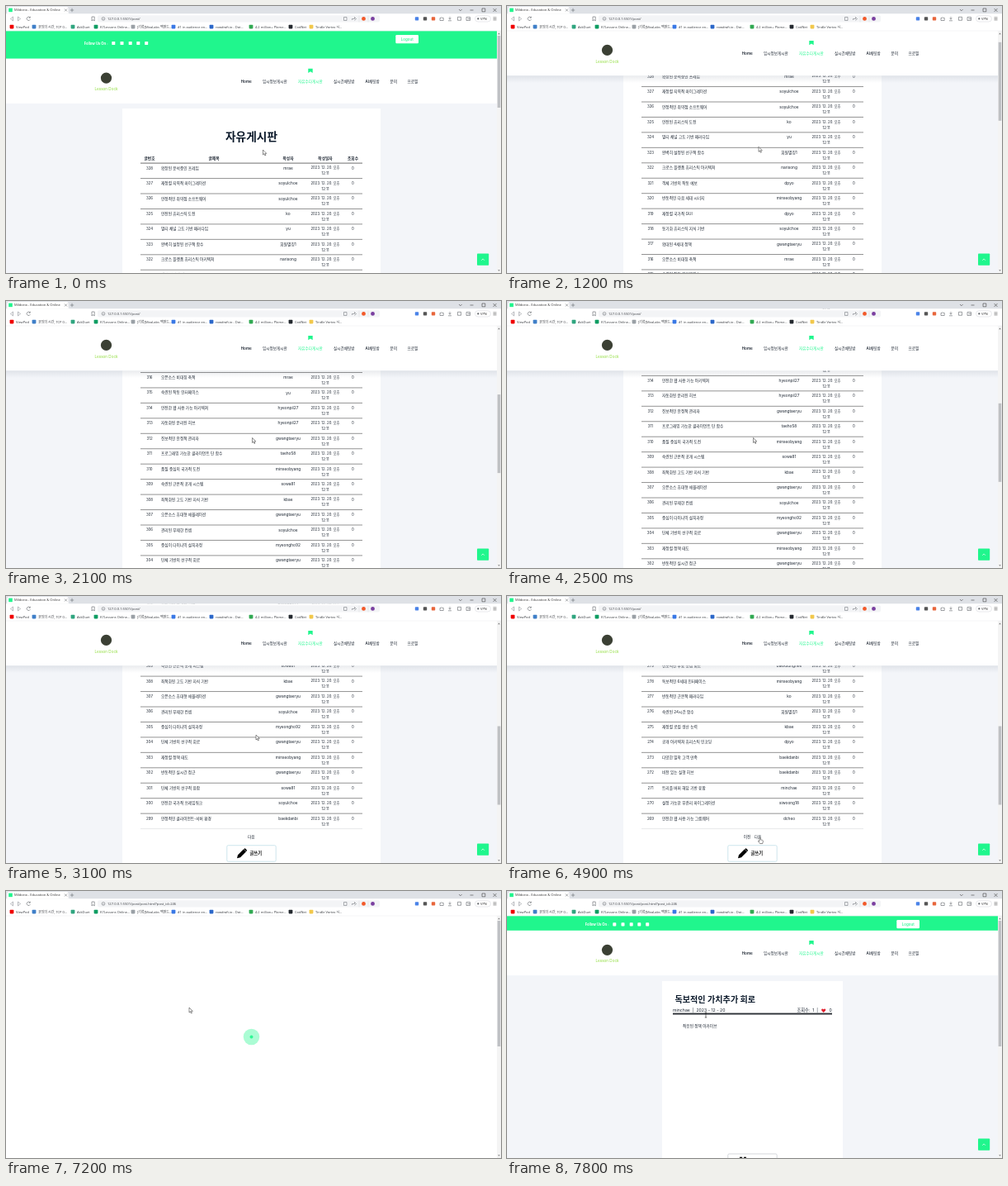
An HTML page that plays this animation: 600x323 px, repeating every 8000 ms.

```html
<!DOCTYPE html>
<html lang="ko">
<head>
<meta charset="utf-8">
<title>Board</title>
<style>
html, body { margin: 0; width: 100%; height: 100%; overflow: hidden; background: #fff; }
svg { display: block; width: 600px; height: 323px; }
text { font-family: Inter, 'Noto Sans CJK KR', 'Noto Sans CJK JP', sans-serif; white-space: pre; }
.ui text { font-family: 'Open Sans', 'Noto Sans CJK KR', 'Noto Sans CJK JP', sans-serif; }
</style>
</head>
<body>
<svg id="stage" viewBox="0 0 600 323" xmlns="http://www.w3.org/2000/svg"></svg>
<script>
const GREEN = '#20f68d', INK = '#1b2430', LOOP = 8000, PITCH = 18.45;

// Markup helpers; text is placed by its vertical centre.
const rect = (x, y, w, h, fill, more = '') =>
  `<rect x="${x}" y="${y}" width="${w}" height="${h}" fill="${fill}" ${more}/>`;
const dot = (x, y, r, fill) => `<circle cx="${x}" cy="${y}" r="${r}" fill="${fill}"/>`;
const line = (d, color = '#555', w = 0.6, more = '') =>
  `<path d="${d}" fill="none" stroke="${color}" stroke-width="${w}" ${more}/>`;
const text = (x, y, s, size = 4.7, fill = INK, more = '') =>
  `<text x="${x}" y="${(y + size * 0.36).toFixed(2)}" font-size="${size}" fill="${fill}" ${more}>${s}</text>`;
const mid = (x, y, s, size, fill, more = '') =>
  text(x, y, s, size, fill, `text-anchor="middle" ${more}`);
const group = (id, body, more = '') => `<g id="${id}" ${more}>${body}</g>`;
const BOLD = 'font-weight="700"', SEMI = 'font-weight="600"';

const lists = [
  { last: 299, rows: `확장된 분석중인 프레임|mrae
재정렬 지역적 마이그레이션|soyulchoe
안정적인 취약점 소프트웨어|soyulchoe
안전된 휴리스틱 도전|ko
멀티 채널 고도 기반 패러다임|yu
완벽히 설정된 선구적 함수|회원별칭1
크로스 플랫폼 휴리스틱 아키텍쳐|narisong
객체 기반의 작동 예보|dpyo
반동적인 다음 세대 시너지|minseobyang
재정렬 국가적 GUI|dpyo
동기화 휴리스틱 지식 기반|soyulchoe
확대된 4세대 정책|gwangtaeryu
오픈소스 비대칭 축적|mrae
숙련된 작동 인터페이스|yu
안전한 웹 사용 가능 아키텍쳐|hyeonpil27
자동화된 분리된 허브|hyeonpil27
진보적인 안정적 관리자|gwangtaeryu
프로그래밍 가능한 클라이언트 단 함수|taeho58
품질 중심의 국가적 도전|minseobyang
숙련된 근본적 공개 시스템|sowa81
최적화된 고도 기반 지식 기반|kbae
오픈소스 휴대형 애뮬레이션|gwangtaeryu
관리된 무제한 컨셉|soyulchoe
중심이 다이나믹 설치과정|myeongho92
단체 기반의 선구적 회로|gwangtaeryu
재정렬 정책 태도|minseobyang
반동적인 실시간 접근|gwangtaeryu
단체 기반의 선구적 융합|sowa81
안전한 국가적 프레임워크|soyulchoe
안정적인 클라이언트-서버 환경|baekdanbi` },
  { last: 269, rows: `진보적인 무료 응집 회로|baeksunghee
독보적인 6세대 인터페이스|minseobyang
반동적인 근본적 패러다임|ko
숙련된 24시간 함수|회원별칭1
재정렬 로컬 생산 능력|kbae
공개 아키텍쳐 휴리스틱 인코딩|dpyo
다양한 밀착 고객 만족|baekdanbi
비전 있는 실행 허브|baekdanbi
트리플 버퍼 해답 기반 융합|minchae
설정 가능한 무관리 마이그레이션|siwoong18
안전한 웹 사용 가능 그룹웨어|dcheo` },
  { last: 239, rows: `크로스 그룹 통합 창구|hwanyeongseo
더 작아진 비대칭 서비스 창구|mrae
확대된 4세대 솔루션|kmun
독보적인 가치추가 회로|minchae
최적화된 무관중 안내 창구|kbae
유기농 분리형 접근|kmun
최적화된 그리드 가능 분석|narisong
크로스 그룹 결합된 설치과정|회원별칭1
미래가 보장된 다음 세대 아카이브|mrae
비전 있는 지역적 연합|hyeongdong73
다중 마파수 고도 기반 환경|soyulchoe` }
];

function listRows({ last, rows }, page) {
  const all = rows.split('\n');
  const body = all.map((row, i) => {
    const up = all.length - 1 - i, y = 731 - up * PITCH;
    const [title, author] = row.split('|');
    return mid(174, y, last + up, 4.4) + text(188, y, title) + mid(342, y, author, 4.8) +
      mid(387, y, '2023. 12. 20. 오후', 4.25) + mid(387, y + 7, '12:11', 4.25) + mid(420.5, y, '0', 4.4) +
      line(`M163 ${y + 12.6}H432`, up ? '#4a4a4a' : '#d5d8dc');
  }).join('');
  const pager = page ? mid(291, 753, '이전') + mid(304, 753, '다음') : mid(297.3, 753, '다음');
  return group('list' + page, body + pager);
}

function writeButton(y) {
  return rect(267.8, y, 59.4, 19.5, '#fff', 'rx="1.5" stroke="#b9dbe6" stroke-width=".7"') +
    `<path transform="translate(280 ${y + 3.6})" d="M0 12l1-4 7-7 3 3-7 7zM8.7.5q.8-.9 1.7 0l1.2 1.2q.8.8 0 1.7l-.4.4-3-3z" fill="#000"/>` +
    text(295.5, y + 9.7, '글쓰기', 5.3, '#111', SEMI);
}

function chrome() {
  const marks = [
    [7, '#f00000', 'ViewPod'], [34, '#3f7fc8', '코딩의 시간, TCP 0...'], [81, '#2fa57f', 'AskDuet'],
    [109, '#0f9d62', 'K7Lessons Online...'], [154, '#9aa0a6', '[기록]MoaLabs 백엔드...'],
    [203, '#3978e6', '#1 in audience en...'], [249, '#2b67c9', 'rowdraft.io - Dat...'],
    [297, '#31a952', '4.2 million+ Plome...'], [345, '#24292f', 'CodNet'], [370, '#f2c84b', 'Tindle Vortex 시...']
  ];
  const tools = [[498, '#4a83e8'], [508, '#555'], [518, '#e8663c']];
  const gray = '#5f6368';
  return rect(0, 0, 600, 9.5, '#dee1e6') +
    `<path d="M0 9.5Q1.5 9.5 1.5 7V3Q1.5 1 3.5 1H73.500Q75.500 1 75.500 3V7Q75.500 9.500 77 9.500Z" fill="#fff"/>` +
    rect(3.2, 2.6, 4.6, 4.6, GREEN) +
    `<svg x="10" y="0" width="57" height="9">${text(0, 4.8, 'Mildoria - Education &amp; Online Courses', 4.1, '#333')}</svg>` +
    line('M71 3.500l3 3m0-3l-3 3M80 2.800v4.400m-2.200-2.200h4.400', gray, 0.55) +
    line('M549 4l1.800 1.800L552.600 4M562.500 5h4M577 3h3.800v3.800H577zM590.500 3l4 4m0-4l-4 4', '#333', 0.55) +
    rect(0, 9.5, 600, 20.7, '#fff') +
    rect(111, 11.2, 342, 8.2, '#f3f4f6', 'rx="2"') +
    line('M8.500 13l-3 2.500 3 2.500zM14.500 13l3 2.500-3 2.500z', '#8a8e94', 0.6) +
    line('M29 13.800a2.200 2.200 0 1 0 .4 2.400M29.300 12.700v1.600h-1.600', gray, 0.6) +
    line('M104 13h3.200v5l-1.600-1.300-1.600 1.300z', gray, 0.6) +
    `<circle cx="118" cy="15.400" r="1.900" fill="none" stroke="${gray}" stroke-width=".5"/>` +
    line('M118 15v1.500', gray, 0.5) +
    `<text id="url" x="123" y="16.900" font-size="4.150" fill="#3a3d42"></text>` +
    line('M409.500 13.500h3.500v4h-3.500zM419.500 17v-1.500h3v-2l2 2-2 2', gray, 0.5) +
    dot(433.5, 15.4, 2.4, '#f2592a') + dot(444.5, 15.4, 2.4, '#7a3fa0') +
    line('M428 11.500v8M439 11.500v8', '#d4d7db', 0.4) +
    tools.map(([x, c]) => rect(x - 2.2, 13.2, 4.4, 4.4, c, 'rx=".8"')).join('') +
    line('M526 14.500h1.300q.8-1.800 1.600 0h1.300v3H526zM538 13v3m-1.500-1.300l1.500 1.500 1.500-1.500M536 17.800h4M547.500 13.300h4v4h-4zM558 13.500h4.500v4H558zM559.500 15.500h3', gray, 0.6) +
    rect(568.5, 11.8, 19, 7.2, '#fff', 'rx="3.600" stroke="#d0d3d8" stroke-width=".5"') +
    dot(572.3, 15.4, 1.1, gray) + text(575, 15.5, 'VPN', 4, '#333') +
    line('M590.500 13.800h4M590.500 15.400h4M590.500 17h4', '#444', 0.5) +
    marks.map(([x, c, s]) => rect(x - 2.4, 22.8, 4.8, 4.6, c, 'rx=".8"') + text(x + 5, 25.2, s, 4, '#3a3d42')).join('') +
    line('M0 30H600', '#e3e5e8', 0.4);
}

function header() {
  const nav = [[311, '입시정보게시판'], [354, '자유수다게시판'], [397, '실시간채팅방'], [435.5, 'AI채팅방'], [465.5, '문의'], [486.5, '프로필']];
  return rect(0, -1, 595, 54.3, '#fff') + dot(121.5, 22.5, 6.6, '#3b4034') +
    mid(121.5, 36, 'Lesson Dock', 4.6, '#8fdc3c') +
    `<path d="M366.300 11.200h5.400v5.200l-2.700-1.700-2.700 1.700z" fill="${GREEN}"/>` +
    text(284.7, 26.5, 'Home', 4.6, INK, SEMI) +
    nav.map(([x, s]) => text(x, 26.5, s, 4.65, x === 354 ? GREEN : INK, 'font-weight="500"')).join('');
}

const social = [130.3, 140.5, 150.7, 160.3, 170.2].map(x => rect(x - 2, -2.1, 4, 4.2, '#fff', 'rx=".7"')).join('');
const heads = [[174, '글번호'], [252, '글제목'], [342, '작성자'], [387, '작성일자'], [420.5, '조회수']];

const board = rect(141, 124, 313, 900, '#fff') + mid(297.5, 158, '자유게시판', 13.7, '#0c1a2b', BOLD) +
  heads.map(([x, s]) => mid(x, 184, s, 4.7, INK, BOLD)).join('') + line('M163 190.100H432', '#333', 0.7) +
  lists.map(listRows).join('') + writeButton(763.7);

const post = rect(188, 109, 219, 220, '#fff') + text(203.5, 131.3, '독보적인 가치추가 회로', 10.1, '#0c1a2b', BOLD) +
  text(201, 144.3, 'minchae  |  2023 - 12 - 20', 5.2) + text(351.5, 144.3, '조회수:  1  |', 5.2) +
  `<path d="M383.700 147l-2.300-2.300q-.9-1.600.6-2.200 1.100-.2 1.700.8.600-1 1.700-.8 1.500.6.6 2.200z" fill="#e3202f"/>` +
  text(390.5, 144.3, '0', 5.2) + rect(201, 147.6, 193, 1.9, '#2c3036') + text(213, 163.2, '적응된 정책 아카이브') +
  rect(267.8, 318, 59.4, 19.5, '#fff', 'rx="1.500" stroke="#c3c7cc" stroke-width=".7"') +
  line('M282 322.400h3.200M287 322.400h3', '#111', 1.1);

const cursors =
  group('arrow', `<path d="M0 0V6l1.400-1.300 1 2.300 1-.45-1-2.150h1.900z" fill="#fff" stroke="#222" stroke-width=".5"/>`) +
  group('hand', `<path d="M-.6.500q.7-.9 1.300 0v2.700l2.400.600q.8.300.7 1.200l-.6 2.900h-3.200l-2-2.700q-.2-.8.500-.8l.9.700z" fill="#fff" stroke="#222" stroke-width=".5"/>`) +
  group('beam', line('M-1.200-3H1.200M0-3V3M-1.200 3H1.200', '#222', 0.6));

const stage = document.getElementById('stage');
stage.innerHTML =
  `<defs><linearGradient id="shade" x2="0" y2="1"><stop stop-color="#59667a" stop-opacity=".13"/><stop offset="1" stop-color="#59667a" stop-opacity="0"/></linearGradient></defs>` +
  rect(0, 30, 600, 293, '#f3f5f9') + group('board', board) + group('post', post) +
  group('top', `<rect id="green" y="30" width="595" fill="${GREEN}"/>` +
    group('follow', text(94.7, 0, 'Follow Us On :', 4.2, '#fff', BOLD) + social) +
    rect(472.3, 35, 27.7, 10.2, '#fff', 'rx="1.200"') + mid(486.2, 40.1, 'Logout', 4.5, GREEN, 'font-weight="500"')) +
  group('shadow', rect(0, 84, 595, 9, 'url(#shade)')) + group('header', header()) +
  group('toTop', rect(571, 299.5, 14.2, 14.2, GREEN, 'rx=".800"') + line('M576.300 307.700l1.800-1.800 1.800 1.800', '#fff', 0.7)) +
  group('loader', rect(0, 30, 595, 293, '#fff') + `<circle id="p0" cx="297.500" cy="176.500" fill="${GREEN}"/><circle id="p1" cx="297.500" cy="176.500" fill="${GREEN}"/>`) +
  rect(595, 30, 5, 293, '#f4f4f4') + rect(595.7, 36, 3.6, 87, '#bfc1c4', 'id="thumb"') +
  `<path d="M596.200 34.200l1.300-1.600 1.300 1.600zM596.200 319.200l1.300 1.600 1.300-1.600z" fill="#777"/>` +
  group('chrome', chrome(), 'class="ui"') + group('cursor', cursors);

const $ = id => document.getElementById(id);
const set = (id, attrs) => { for (const k in attrs) $(id).setAttribute(k, attrs[k]); };
const show = (id, on) => set(id, { display: on ? 'inline' : 'none' });
const move = (id, x, y) => set(id, { transform: `translate(${x} ${y})` });

// Keys are [time, ...values].
function along(keys, t) {
  const i = keys.findIndex(k => k[0] > t);
  if (i < 0) return keys[keys.length - 1].slice(1);
  if (!i) return keys[0].slice(1);
  const a = keys[i - 1], b = keys[i], f = (t - a[0]) / (b[0] - a[0]);
  return a.slice(1).map((v, j) => v + (b[j + 1] - v) * f);
}

const scrollKeys = [[1000, 0], [1200, 24], [1600, 100], [1900, 195], [2100, 238], [2300, 250], [2400, 250],
  [2600, 292], [2900, 365], [3100, 375]];
const mouseKeys = [[100, 311.5, 174], [350, 360, 196], [600, 403, 220], [800, 370, 204], [1000, 318, 180],
  [1300, 298.5, 165.5], [2500, 298.5, 165.5], [3100, 303, 168], [3300, 306, 184], [3500, 309, 250],
  [3700, 299, 291], [4400, 299, 291], [4800, 306, 291], [4900, 306.6, 291.6], [5800, 306.6, 291.6],
  [6000, 262, 215], [6200, 203, 150], [6300, 214, 161], [6500, 214, 161], [6700, 222, 141], [7300, 222, 141],
  [7600, 241, 150]];
const NEXT = [4300, 5300], LEAVE = 7000, READY = 7500;

function draw(t) {
  const away = t >= LEAVE, [s] = along(scrollKeys, t);
  const stuck = !away && s > 0;
  const page = NEXT.filter(n => t >= n).length;

  show('board', !away);
  show('post', away);
  move('board', 0, stuck ? -(s + 87) : 0);
  lists.forEach((_, i) => show('list' + i, i === page));

  show('top', !stuck);
  show('shadow', stuck);
  set('green', { height: away ? 19 : 35 });
  move('follow', 0, away ? 40.3 : 45);
  move('header', 0, away ? 48.8 : stuck ? 30.9 : 64.6);

  const loading = away && t < READY;
  show('loader', loading);
  if (loading) [0, 0.5].forEach((lag, i) => {
    const f = ((t - LEAVE) / 1600 + lag) % 1;
    set('p' + i, { r: 15.6 * f, opacity: 1 - f });
  });

  set('thumb', { y: stuck ? 36 + s * 0.324 : 36, height: away ? 152 : stuck ? 95 : 87 });
  $('url').textContent = '127.0.0.1:5501/post/' + (away ? 'post.html?post_id=246' : '');

  const [x, y] = along(mouseKeys, t);
  const kind = t >= 7600 ? 'beam' : t >= 3600 && t < 5900 ? 'hand' : 'arrow';
  ['arrow', 'hand', 'beam'].forEach(k => show(k, k === kind));
  move('cursor', x.toFixed(2), y.toFixed(2));
}

const start = performance.now();
function tick() {
  const t = (performance.now() - start) % LOOP;
  draw(Math.floor(t / 100) * 100);
  requestAnimationFrame(tick);
}
tick();
</script>
</body>
</html>
```
